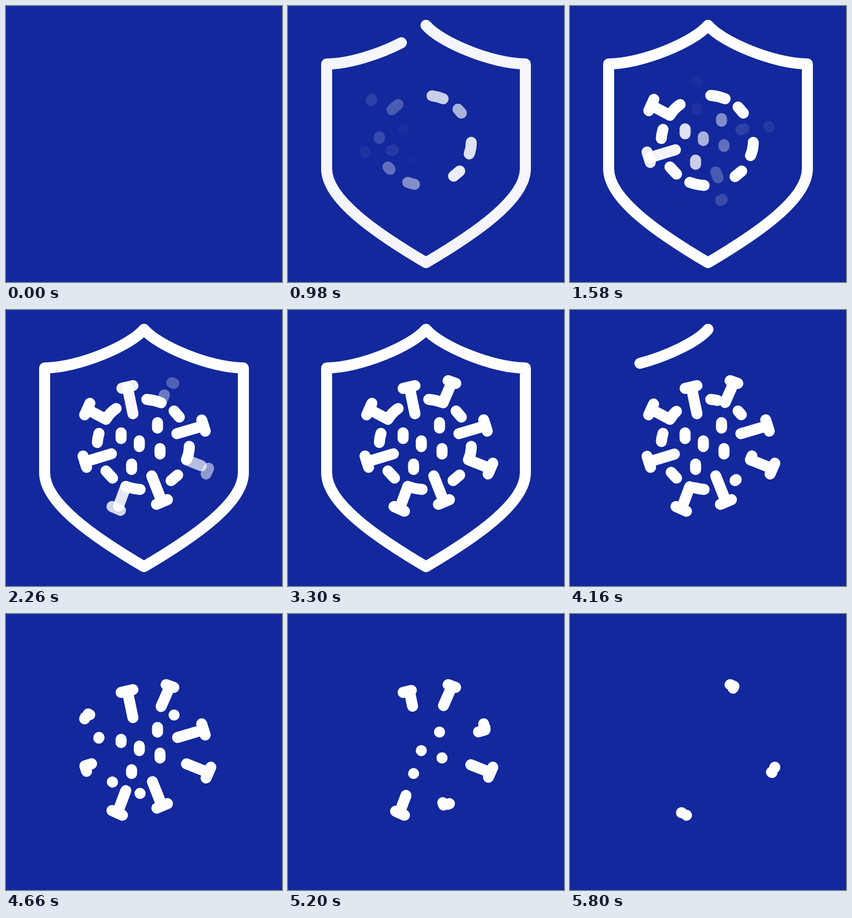
Write an HTML page that moves like this. It is 500 px wide and 500 px high and loops after 5820 ms.

```html
<!DOCTYPE html>
<html lang="en">
<head>
<meta charset="utf-8">
<title>Shield and virus line drawing</title>
<style>
  html, body { margin: 0; width: 100%; height: 100%; overflow: hidden; background: #12289c; }
  svg { display: block; width: 100vw; height: 100vh; }
  path { fill: none; stroke: #fff; stroke-width: 20; stroke-linecap: round; stroke-linejoin: round; }
</style>
</head>
<body>
<svg viewBox="0 0 500 500"></svg>
<script>
const LOOP = 5820, STAGGER = 60, DURATION = 1200, ERASE_AT = 3275;

// Listed in drawing order; each path runs in its drawing direction.
const SHAPES = [
  // shield
  'M250 35C275 65 370 105 430 105V295C430 350 340 412 250 465C160 412 70 350 70 295V105C130 105 225 65 250 35',
  // ring
  'M311 299L299 309',
  'M332 247Q332 260 327 271',
  'M281 168Q268 163 255 162',
  'M314 194L304.500 183',
  'M217 319.500Q229 324 243 325',
  'M181 291.500L193 304.500',
  'M199.500 178.500Q189 185 181 198L149 181',
  'M165.500 240Q166 231 168.500 223.500',
  // left spikes
  'M152 169L142.500 190',
  'M191 260.500L143 275',
  'M139.500 264.500L146 285',
  // inner dots
  'M208.500 222.500V233',
  'M227.500 279V289',
  'M241.500 237V247.500',
  'M274.500 204V214',
  'M279 251V261',
  // remaining spikes, stem then head
  'M264 300.500L282 346', 'M272.500 352L292.500 343.500',
  'M309.500 224L357 210', 'M361 219.500L354.500 199',
  'M230 188L220 140', 'M230 137L208.500 142',
  'M217 320L202 360', 'M192 356L211 364.500',
  'M327 271.500L366 287', 'M362.500 297L371 277.500',
  'M281 167.500L297 131', 'M304 133L290 128'
];

const svg = document.querySelector('svg');
const strokes = SHAPES.map(d => {
  const el = document.createElementNS('http://www.w3.org/2000/svg', 'path');
  el.setAttribute('d', d);
  svg.append(el);
  return { el, len: el.getTotalLength() };
});

// cubic-bezier(.8, 0, .4, 1)
function ease(x) {
  if (x <= 0) return 0;
  if (x >= 1) return 1;
  let lo = 0, hi = 1;
  for (let k = 0; k < 26; k++) {
    const s = (lo + hi) / 2, r = 1 - s;
    if (3 * r * r * s * .8 + 3 * r * s * s * .4 + s * s * s < x) lo = s;
    else hi = s;
  }
  return lo * lo * (3 - 2 * lo);
}

function render(t) {
  strokes.forEach(({ el, len }, i) => {
    const age = t - i * STAGGER;
    const drawn = ease(age / DURATION);
    const erased = ease((age - ERASE_AT) / DURATION);
    const shown = drawn > 0 && erased < 1;
    el.style.display = shown ? '' : 'none';
    if (!shown) return;
    el.style.strokeOpacity = drawn;
    el.style.strokeDasharray = `${len * (drawn - erased) + (drawn === 1 ? 1 : 0)} ${len * 3}`;
    el.style.strokeDashoffset = -len * erased;
  });
}

const start = performance.now();
function tick() {
  render((performance.now() - start) % LOOP);
  requestAnimationFrame(tick);
}
tick();
</script>
</body>
</html>
```
